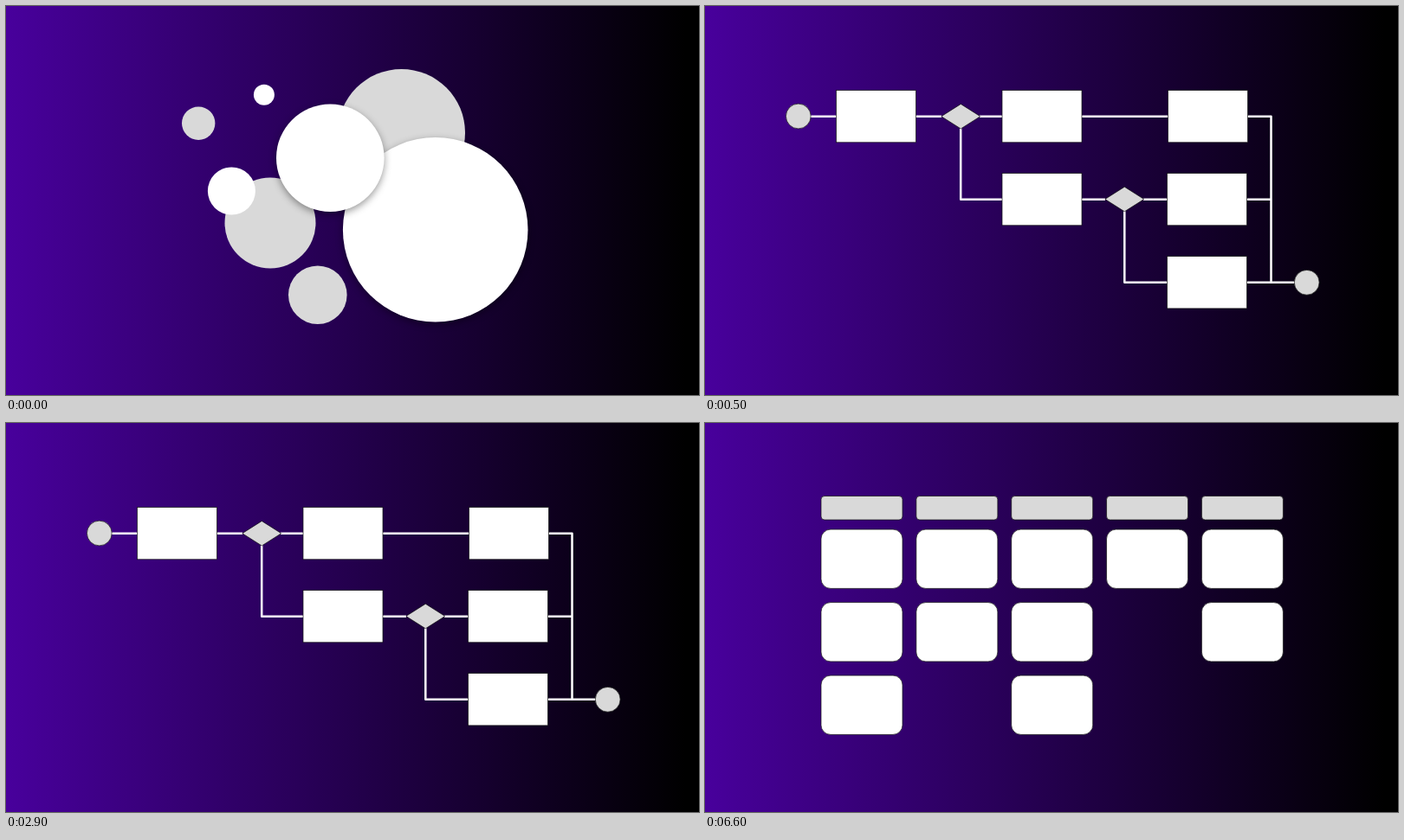
Recreate the animation shown at these times as an HTML page. Size 800 by 450 pixels, loop 8000 ms.

```html
<!DOCTYPE html>
<html lang="en">
<head>
<meta charset="utf-8">
<style>
  html, body { margin: 0; width: 100%; height: 100%; overflow: hidden; background: #000; }
  svg { display: block; width: 100%; height: 100%; }
  .white { fill: #fff; }
  .gray { fill: #d9d9d9; }
  .raised { filter: drop-shadow(0 3px 4px rgba(0, 0, 0, .4)); }
  .outlined { stroke: #111; stroke-width: .7; }
  .wire { fill: none; stroke: #fff; stroke-width: 2.5; stroke-linejoin: round; }
</style>
</head>
<body>
<svg viewBox="0 0 800 450">
  <defs>
    <linearGradient id="backdrop">
      <stop offset="0" stop-color="#48009c"/>
      <stop offset=".98" stop-color="#000"/>
    </linearGradient>
  </defs>
  <rect width="800" height="450" fill="url(#backdrop)"/>
  <g id="bubbles"></g>
  <g id="flowchart"></g>
  <g id="board"></g>
</svg>
<script>
const LOOP = 8000;
const scenes = [
  { id: 'bubbles', start: 0 },
  { id: 'flowchart', start: 500 },
  { id: 'board', start: 4500 }
].map(scene => ({ ...scene, node: document.getElementById(scene.id) }));
const [bubbles, flowchart, board] = scenes.map(scene => scene.node);

function add(parent, tag, attributes) {
  const node = document.createElementNS('http://www.w3.org/2000/svg', tag);
  for (const name in attributes) node.setAttribute(name, attributes[name]);
  parent.append(node);
}
const circle = (parent, cx, cy, r, style) =>
  add(parent, 'circle', { cx, cy, r, class: style });
const box = (parent, x, y, width, height, rx, style) =>
  add(parent, 'rect', { x, y, width, height, rx, class: style + ' outlined' });

[
  [222.2, 135.7, 19.2, 'gray'],
  [297.9, 102.8, 12, 'white'],
  [305, 251, 52.5, 'gray'],
  [260.4, 214, 27.5, 'white'],
  [359.8, 334.2, 33.8, 'gray'],
  [456.5, 146.5, 73.5, 'gray'],
  [495.7, 258.8, 106.8, 'white raised'],
  [374.3, 175.7, 62.3, 'white raised']
].forEach(bubble => circle(bubbles, ...bubble));

add(flowchart, 'path', {
  class: 'wire',
  d: 'M121 127.7H273M317 127.7H653.5V319.8M295.2 141V223.7H462' +
     'M506 223.7H653.5M484.3 237V319.8H682'
});
[[151.5, 97.5], [343, 97.5], [534.5, 97.5], [343, 193.5], [533.5, 193.5], [533.5, 289.6]]
  .forEach(([x, y]) => box(flowchart, x, y, 92, 60.3, 0, 'white'));
[[295.3, 127.7], [484.3, 223.5]].forEach(([x, y]) => add(flowchart, 'path', {
  class: 'gray outlined',
  d: `M${x - 22.5} ${y}L${x} ${y - 14.3}L${x + 22.5} ${y}L${x} ${y + 14.3}Z`
}));
circle(flowchart, 107.8, 127.5, 14.4, 'gray outlined');
circle(flowchart, 694.7, 319.8, 14.4, 'gray outlined');

[3, 2, 3, 1, 2].forEach((cards, column) => {
  const x = 134 + column * 109.85;
  box(board, x, 84.5, 94, 27.5, 4, 'gray');
  for (let row = 0; row < cards; row++)
    box(board, x, 123.1 + row * 84.5, 94, 68.3, 11, 'white');
});

function draw(now) {
  const time = now % LOOP;
  const current = scenes.findLast(scene => time >= scene.start);
  for (const scene of scenes)
    scene.node.style.display = scene === current ? '' : 'none';
  requestAnimationFrame(() => draw(performance.now()));
}
draw(0);
</script>
</body>
</html>
```
